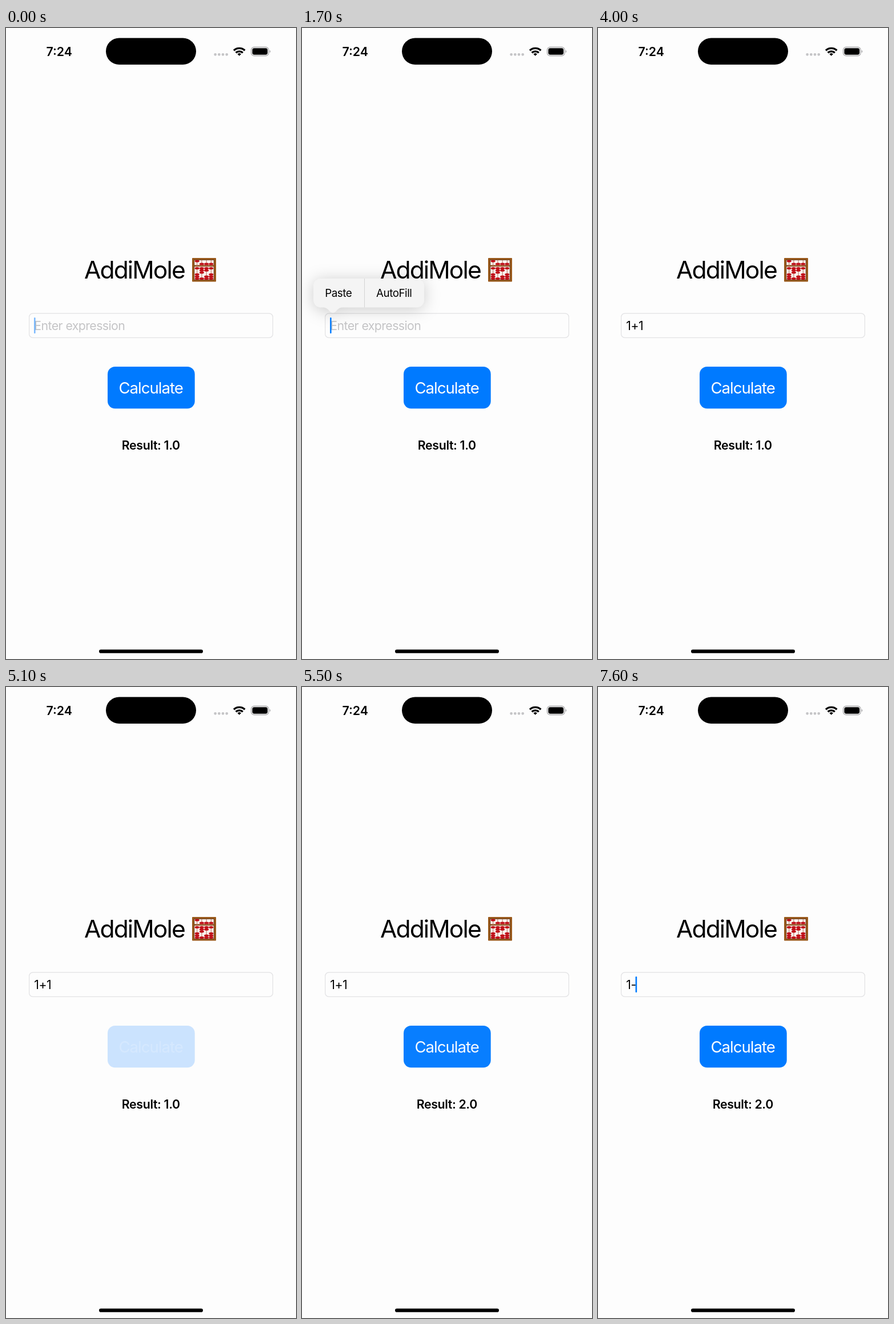
An HTML page for the animation above (8000 ms loop, 508 by 1103 pixels).

```html
<!DOCTYPE html>
<html lang="en">
<head>
<meta charset="utf-8">
<title>Calculator</title>
<style>
  html, body { margin: 0; width: 100%; height: 100%; overflow: hidden; background: #fdfdfd; }
  svg { display: block; width: 100%; height: 100%; }
  text { font: 400 21.3px Inter, Roboto, sans-serif; font-optical-sizing: none; white-space: pre; }
  .bold { font-weight: 600; }
  .title { font-size: 42.6px; letter-spacing: -1.9px; }
  .label { font-size: 27.6px; letter-spacing: -1px; }
  .item { font-size: 18.8px; letter-spacing: -.45px; }
  #field { letter-spacing: -.58px; }
  #result { letter-spacing: -.35px; }
  #menu { filter: drop-shadow(0 3px 14px rgba(0, 0, 0, .2)); }
</style>
</head>
<body>
<svg viewBox="0 0 508 1103">
  <!-- status bar -->
  <text class="bold" x="70.5" y="49">7:24</text>
  <rect x="175" y="17.5" width="158" height="46.5" rx="23.2"/>
  <path d="M366.6 46.3h20.2" stroke="#c5c5c7" stroke-width="4.8" stroke-linecap="round" stroke-dasharray="0 6.7"/>
  <path d="M399 39.3a14 14 0 0 1 19.4 0M402.6 43.3a8.7 8.7 0 0 1 12.2 0" fill="none" stroke="#000" stroke-width="3.3"/>
  <path d="M408.7 48.8l-3.3-3.3a4.8 4.8 0 0 1 6.6 0z"/>
  <rect x="429.5" y="33.4" width="30.6" height="15.2" rx="5" fill="none" stroke="#a0a0a2" stroke-width="1.2"/>
  <rect x="431.4" y="35.3" width="26.8" height="11.4" rx="3.4"/>
  <path d="M461.8 38.6q3 2.4 0 4.9z" fill="#a0a0a2"/>

  <!-- heading -->
  <text class="title" x="137" y="438">AddiMole</text>
  <g id="abacus">
    <rect x="326" y="402" width="42" height="41.5" rx="1" fill="#9a5a1c"/>
    <rect x="329.7" y="405.3" width="34.6" height="34.9" fill="#fbf3ef" stroke="#5f3310"/>
    <path d="M330 415.8h34" stroke="#8a4d18" stroke-width="2.4"/>
  </g>

  <!-- form -->
  <rect x="40.6" y="498.8" width="426.8" height="42.6" rx="6.5" fill="none" stroke="#e2e2e4" stroke-width="1.2"/>
  <text id="field" x="49.3" y="528"></text>
  <g id="button">
    <rect x="178" y="592" width="152.7" height="73.3" rx="13" fill="#007aff"/>
    <text class="label" x="197.4" y="638.5" fill="#fff">Calculate</text>
  </g>
  <text id="result" class="bold" x="253.8" y="736.8" text-anchor="middle"></text>

  <g id="menu">
    <path d="M33 438H201a13 13 0 0 1 13 13v24.5a13 13 0 0 1-13 13H70c-5 0-8 4-11.5 7.5q-4.5 4-9 0C46 492.5 43 488.5 38 488.5h-5a13 13 0 0 1-13-13V451a13 13 0 0 1 13-13z" fill="#f4f4f4"/>
    <path d="M109.500 438v50.500" stroke="#d3d3d3"/>
    <text class="item" x="40.2" y="470">Paste</text>
    <text class="item" x="130" y="470">AutoFill</text>
  </g>
  <rect id="caret" y="506" width="2.6" height="28" rx="1.3" fill="#007aff"/>
  <rect x="163" y="1086.6" width="182" height="6.2" rx="3.1"/>
</svg>
<script>
const $ = id => document.getElementById(id);
const set = (node, name, value) => node.setAttribute(name, value);
const clamp = v => Math.min(1, Math.max(0, v));
const easeOut = u => 1 - (1 - clamp(u)) ** 3;

// Each rod has one bead above the bar and four below, some of them pushed up
let beads = '';
[1, 3, 2, 1].forEach((raised, rod) => {
  const x = 334.7 + rod * 8.2;
  const bead = y => `<ellipse cx="${x}" cy="${y}" rx="4" ry="2" fill="#c01019"/>`;
  beads += `<path d="M${x} 406v34" stroke="#b5705c"/>` + bead(rod ? 412.5 : 407.5);
  for (let i = 0; i < 4; i++) beads += bead(420 + i * 3.7 + (i < raised ? 0 : 7));
});
$('abacus').innerHTML += beads;

// What the field holds after each touch; null means it loses the caret
const touches = [
  [-500, ''], [2200, '1'], [2900, '1+'], [3400, '1+1'], [4000, null],
  [6200, '1+1'], [7000, '1+'], [7200, '1'], [7600, '1-'],
];

// Solid for half a second after a touch, then blinking with short fades
function blink(since) {
  if (since < 500) return 1;
  const phase = (since - 500) % 1050;
  return phase < 300 ? clamp(.5 - phase / 150) : clamp(.5 + (phase - 580) / 150);
}

function draw(t) {
  const [time, value] = touches.findLast(touch => touch[0] <= t);
  const text = value ?? '1+1';
  $('field').textContent = text || 'Enter expression';
  set($('field'), 'fill', text ? '#000' : '#c4c4c6');
  set($('caret'), 'x', text ? 48.3 + $('field').getComputedTextLength() : 49);
  set($('caret'), 'opacity', value === null ? 0 : blink(t - time));

  const pressed = t < 5100 ? 0 : 1 - easeOut((t - 5100) / 600);
  for (const part of $('button').children) set(part, 'opacity', 1 - .8 * pressed);
  $('result').textContent = t < 5300 ? 'Result: 1.0' : 'Result: 2.0';

  // The menu grows from its tail, then fades away
  const shown = easeOut((t - 800) / 600);
  set($('menu'), 'opacity', shown * clamp((2400 - t) / 400));
  set($('menu'), 'transform', `translate(54 498) scale(${.6 + .4 * shown}) translate(-54 -498)`);
}

const start = performance.now();
function tick(now) {
  // The screen refreshes ten times a second
  draw(Math.floor(Math.max(0, now - start) % 8000 / 100) * 100);
  requestAnimationFrame(tick);
}
tick(start);
</script>
</body>
</html>
```
